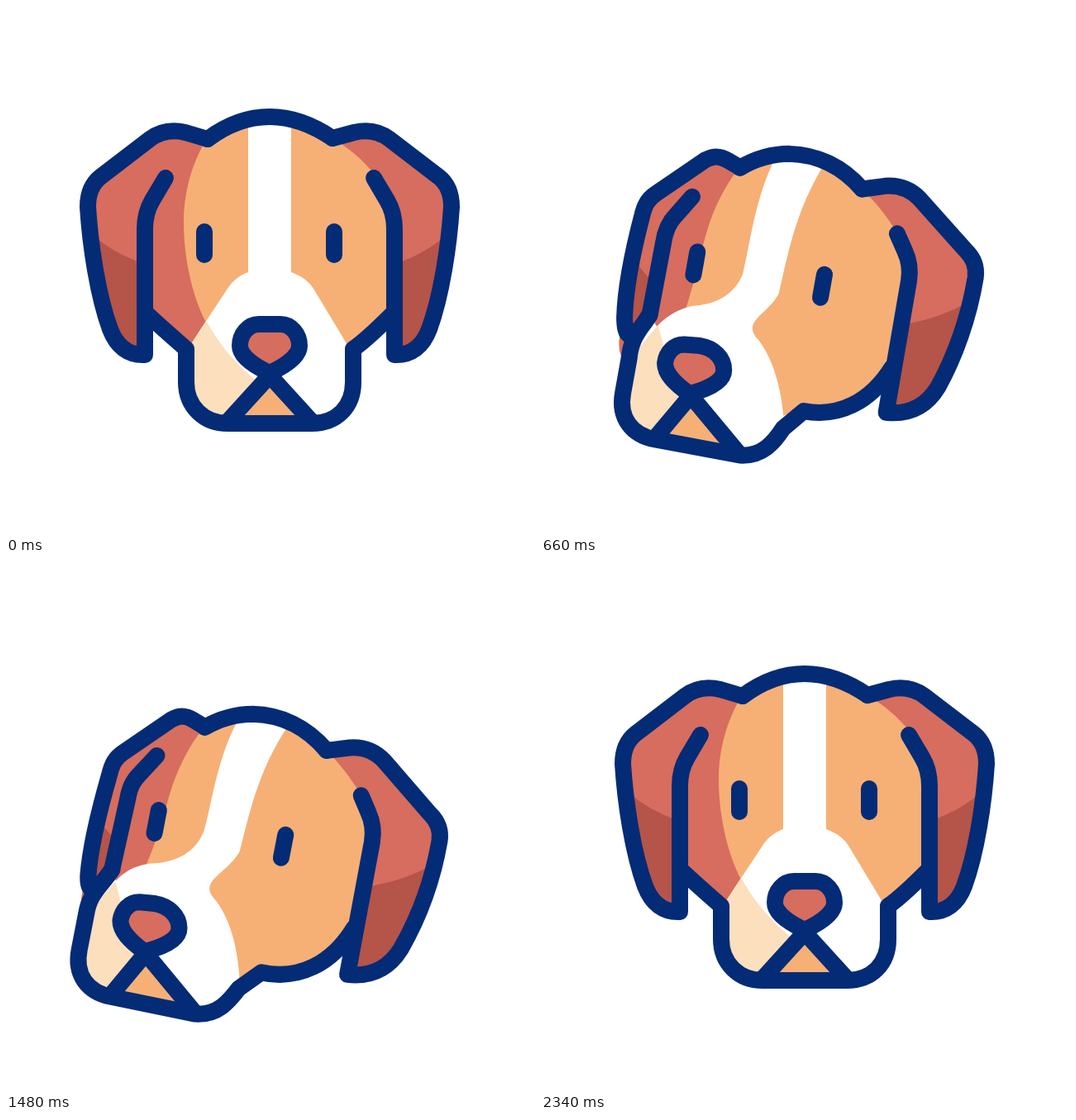
These frames come from a looping animation (640x640 px, 2.4 s). An HTML page with a canvas:

```html
<!DOCTYPE html>
<html lang="en">
<head>
<meta charset="utf-8">
<title>Dog turning its head</title>
<style>
  html, body { margin: 0; width: 100%; height: 100%; overflow: hidden; background: #fff; }
  canvas { display: block; }
</style>
</head>
<body>
<canvas id="stage" width="640" height="640"></canvas>
<script>
const ctx = document.getElementById('stage').getContext('2d');
const NAVY = '#042b76', RED = '#d66d5e', DARK = '#b55449',
      ORANGE = '#f6b075', CREAM = '#fcdfbd', WHITE = '#fff';
const LOOP = 2400, TURN_END = 1084, BACK_START = 1100, BACK_END = 2270;

// Each shape lists its poses: front, (halfway), turned.
const shapes = {
  leftEar: [
    'M244 161 L217 153 C200 149 186 152 174 161 L114 207 C104 215 99 227 99 243 C102 290 111 350 126 391 C134 412 148 423 168 422 L168 270 C168 256 171 245 177 235 L193 208',
    'M242 182 L225 174 C211 167 202 168 190 174 L126 219 C116 226 112 236 110 250 C105 290 104 335 110 375 C113 408 119 430 146 392 L154 285 C155 268 160 255 168 246 L186 221',
    'M240 202 L227 194 C217 188 210 189 202 194 L146 232 C137 238 133 245 130 256 C116 300 102 345 97 382 C96 392 102 396 124 366 L146 285 C149 272 152 266 160 258 L182 236'],
  leftEarFill: [
    'M244 161 L217 153 L174 161 L114 207 L99 243 C102 290 111 350 126 391 C134 414 148 423 168 422 L168 270 L193 208 L215 205 Z',
    'M242 182 L225 174 L190 174 L126 219 L110 250 C105 290 104 335 110 375 C106 405 112 432 137 432 L154 285 L186 221 L210 220 Z',
    'M240 202 L227 194 L202 194 L146 232 L130 256 C116 300 102 345 97 382 C84 400 86 424 80 420 L146 285 L182 236 L205 235 Z'],
  leftFold: [
    'M103 275 Q130 300 168 312 L168 422 C148 423 134 412 126 391 Z',
    'M110 290 Q128 312 150 328 L146 392 C119 430 113 408 110 375 Z',
    'M112 315 Q120 330 134 340 L124 366 C102 396 96 392 97 382 Z'],
  rightEar: [
    'M395 160 L421 153 C438 149 452 152 464 161 L524 207 C534 215 539 227 539 243 C536 290 527 350 512 391 C504 412 490 423 470 422 L470 270 C470 256 467 245 461 235 L445 208',
    'M387 234 L415 231 C432 230 446 236 457 248 L512 314 C521 323 525 334 523 346 C514 395 495 440 474 475 C458 500 435 509 407 506 L440 345 C443 328 440 318 436 309 L428 289'],
  rightFold: [
    'M535 275 Q508 300 470 312 L470 422 C490 423 504 412 512 391 Z',
    'M518 372 Q480 394 432 400 L407 506 C435 509 458 500 474 475 Z'],
  crown: [
    'M244 161 C268 143 293 134 319 134 C345 134 370 143 395 160',
    'M240 203 C258 193 278 188 297 188 C331 189 363 204 387 234'],
  head: [
    'M244 161 C268 143 293 134 319 134 C345 134 370 143 395 160 C415 172 432 186 447 205 C458 222 468 250 468 270 L468 372 C452 388 436 404 420 415 L300 480 L222 412 L205 270 L215 200 Z',
    'M240 203 C258 193 278 188 297 188 C331 189 363 204 387 234 C402 250 416 268 427 288 C438 310 443 330 440 345 L416 447 C388 494 345 514 297 502 L230 520 L135 375 L165 300 L203 232 Z'],
  shade: [
    'M243 160 C225 190 215 225 215 262 C215 310 228 360 245 388 L222 415 L168 372 L168 270 L193 208 Z',
    'M240 202 C212 235 199 272 190 305 C181 332 170 350 158 372 L125 385 L125 375 L146 285 L182 236 Z'],
  blaze: [
    'M293 134 C293 200 293 260 293 322 C283 326 275 331 268 342 C253 365 237 388 222 412 L220 420 L218 455 C218 485 240 505 268 505 L370 505 C400 505 420 485 420 455 L416 415 C400 388 384 362 372 342 C364 330 355 326 345 322 C345 260 345 200 345 134 Z',
    'M284 186 C252 232 245 290 234 322 C224 350 200 364 165 364 C150 364 138 366 125 378 L84 425 L75 467 C68 498 84 519 112 525 L214 548 C241 550 254 533 267 519 L268 505 C266 460 255 430 240 412 C218 388 258 380 276 350 C288 312 299 256 342 200 Z'],
  cheek: [
    'M243 382 C258 410 278 433 305 455 L319 452 L262 510 L200 510 L200 400 Z',
    'M120 380 C124 400 128 430 150 472 L152 480 L108 535 L50 530 L60 380 Z'],
  jaw: [
    'M468 372 C452 388 436 404 420 415 L420 455 C420 485 400 505 370 505 L268 505 C240 505 218 485 218 455 L218 415 C202 401 186 387 170 372',
    'M416 447 C388 494 345 514 297 502 L267 519 C254 533 241 550 214 548 L112 525 C84 519 68 498 75 467 L84 425 C90 398 105 392 124 369'],
  mouth: [
    'M268 503 L319 447 L370 503',
    'M111 524 L153 473 L213 546'],
  nose: [
    'M306 385 L332 385 C345 385 355 397 355 411 C355 422 341 434 319 444 C297 434 283 422 283 411 C283 397 293 385 306 385 Z',
    'M146 411 L164 413 C181 416 194 428 194 443 C194 457 174 466 151 471 C133 457 123 446 123 433 C125 420 134 411 146 411 Z'],
  eyes: [
    'M240 273 L240 301 M397 273 L397 301',
    'M179 301 L173 329 M332 334 L326 362']
};

function morph(name, p) {
  const poses = shapes[name];
  const weights = poses.length === 2
    ? [1 - p, p]
    : [(1 - p) * (1 - 2 * p), 4 * p * (1 - p), p * (2 * p - 1)];
  const values = poses.map(d => d.match(/\d+/g));
  let i = 0;
  return new Path2D(poses[0].replace(/\d+/g, () => {
    const v = weights.reduce((sum, w, k) => sum + w * values[k][i], 0);
    i++;
    return v.toFixed(3);
  }));
}

// Cubic bezier (.8, 0, .2, 1), solved by bisection.
function ease(x) {
  let lo = 0, hi = 1;
  for (let i = 0; i < 24; i++) {
    const s = (lo + hi) / 2, r = 1 - s;
    if (2.4 * r * r * s + 0.6 * r * s * s + s * s * s < x) lo = s; else hi = s;
  }
  return lo * lo * (3 - 2 * lo);
}

function turnAt(t) {
  return t < BACK_START
    ? ease(Math.min(1, t / TURN_END))
    : 1 - ease(Math.min(1, (t - BACK_START) / (BACK_END - BACK_START)));
}

function draw(p) {
  const fill = (name, color) => { ctx.fillStyle = color; ctx.fill(morph(name, p)); };
  const stroke = name => ctx.stroke(morph(name, p));
  // Parts nearer the viewer swing along a slight downward arc.
  const arc = (depth, paint) => {
    ctx.save();
    ctx.translate(0, 4 * depth * p * (1 - p));
    paint();
    ctx.restore();
  };

  ctx.fillStyle = WHITE;
  ctx.fillRect(0, 0, 640, 640);
  ctx.strokeStyle = NAVY;
  ctx.lineWidth = 20;
  ctx.lineCap = ctx.lineJoin = 'round';

  fill('leftEarFill', RED);
  fill('leftFold', DARK);
  fill('rightEar', RED);
  fill('rightFold', DARK);
  fill('head', ORANGE);
  fill('shade', RED);

  arc(5, () => {
    fill('blaze', WHITE);
    ctx.save();
    ctx.clip(morph('blaze', p));
    fill('cheek', CREAM);
    ctx.restore();
    fill('mouth', ORANGE);
  });

  ['leftEar', 'rightEar', 'crown'].forEach(stroke);
  arc(2, () => stroke('eyes'));
  arc(5, () => {
    stroke('jaw');
    stroke('mouth');
    fill('nose', RED);
    stroke('nose');
  });
}

function frame() {
  draw(turnAt(performance.now() % LOOP));
  requestAnimationFrame(frame);
}
frame();
</script>
</body>
</html>
```
